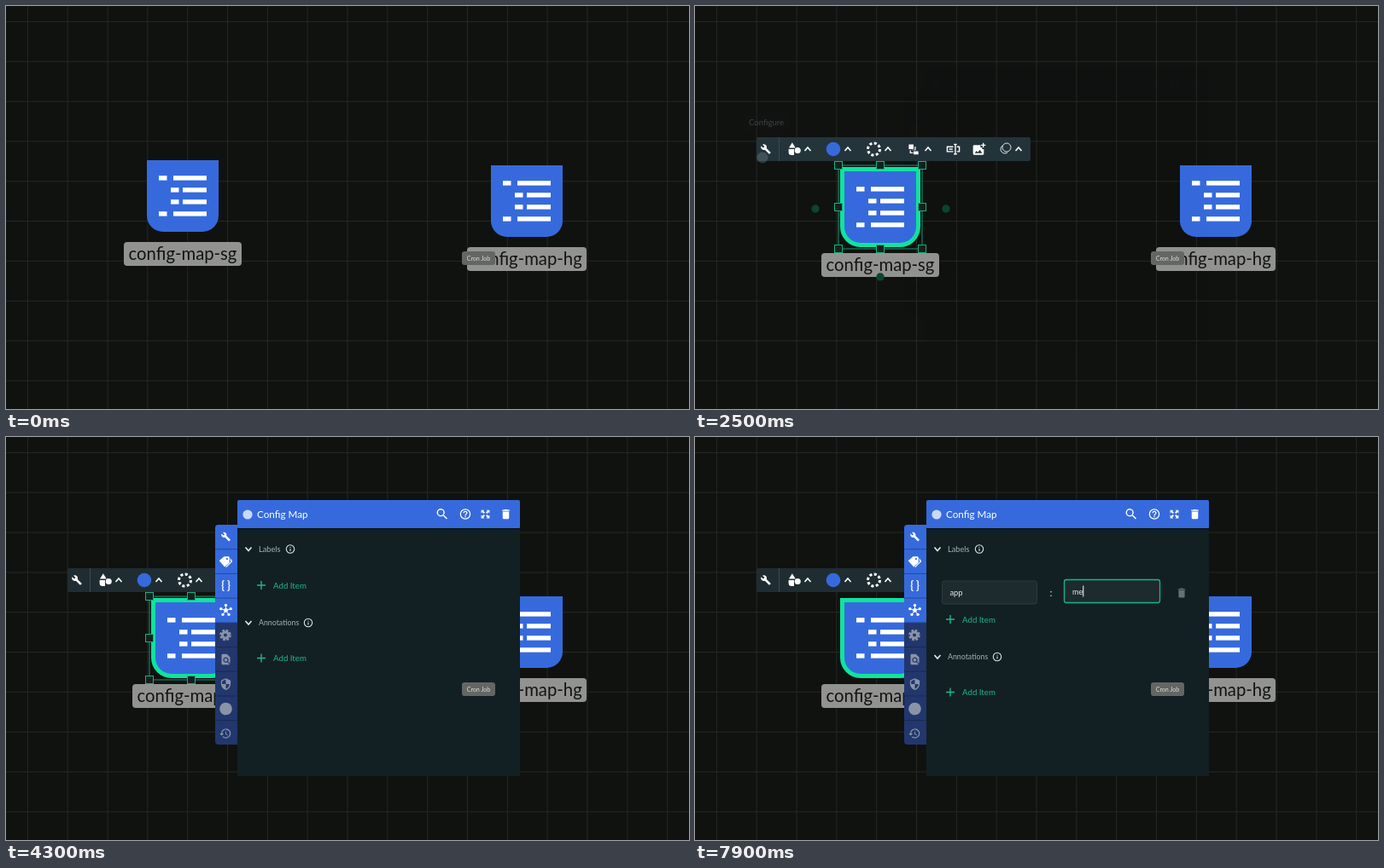
Recreate the animation shown at these times as an HTML page. Size 800 by 473 pixels, loop 8000 ms.

```html
<!DOCTYPE html>
<html lang="en">
<head>
<meta charset="utf-8">
<title>Config map editor</title>
<style>
html, body { margin: 0; width: 100%; height: 100%; overflow: hidden; background: #101210; }
svg { display: block; width: 800px; height: 473px; }
text { font-family: Lato, "Open Sans", sans-serif; white-space: pre; }
</style>
</head>
<body>
<svg id="stage" viewBox="0 0 800 473" xmlns="http://www.w3.org/2000/svg"></svg>
<script>
const LOOP = 8000;
const BLUE = '#366adc', GREEN = '#0fe3a0', TEAL = '#21b78c', PALE = '#e6eaea', GREY = '#a9b1b1';

const ring = 'M12 2a10 10 0 1 0 0 20 10 10 0 0 0 0-20zm0 18a8 8 0 1 1 0-16 8 8 0 0 1 0 16z';
const ICONS = {
  wrench: 'M22.7 19l-9.1-9.1c.9-2.3.4-5-1.5-6.9-2-2-5-2.4-7.4-1.3L9 6 6 9 1.6 4.7C.4 7.1.9 10.1 2.9 12.1c1.9 1.9 4.6 2.4 6.9 1.5l9.1 9.1c.4.4 1 .4 1.4 0l2.3-2.3c.5-.4.5-1.1.1-1.4z',
  search: 'M15.5 14h-.8l-.3-.3a6.5 6.5 0 1 0-.7.7l.3.3v.8l5 5 1.5-1.5zm-6 0a4.5 4.5 0 1 1 0-9 4.5 4.5 0 0 1 0 9z',
  help: ring + 'M11 16h2v2h-2zM12 6a4 4 0 0 0-4 4h2a2 2 0 1 1 4 0c0 2-3 1.75-3 5h2c0-2.25 3-2.5 3-5a4 4 0 0 0-4-4z',
  info: ring + 'M11 7h2v2h-2zM11 11h2v6h-2z',
  trash: 'M6 19a2 2 0 0 0 2 2h8a2 2 0 0 0 2-2V7H6zM19 4h-3.5l-1-1h-5l-1 1H5v2h14z',
  expand: 'M3 3h7L7.7 5.3 11 8.600 8.600 11 5.300 7.700 3 10zM21 3v7l-2.300-2.300L15.400 11 13 8.600l3.300-3.300L14 3zM3 21v-7l2.300 2.300L8.600 13 11 15.400l-3.300 3.300L10 21zM21 21h-7l2.300-2.300L13 15.400 15.400 13l3.300 3.300L21 14z',
  tag: 'M1 11 9 4h7a2 2 0 0 1 2 2v8l-8 7zM14 6.500a1.500 1.500 0 1 0 0 3 1.500 1.500 0 0 0 0-3zM19 6l4 6-10 10-1.500-1L20 13z',
  page: 'M20 19.600V8l-6-6H6a2 2 0 0 0-2 2v16a2 2 0 0 0 2 2h12l1.200-.4-4.400-4.400A5 5 0 1 1 16.200 15.800zM9 13a3 3 0 1 0 6 0 3 3 0 0 0-6 0z',
  shield: 'M12 1 3 5v6c0 5.500 3.800 10.700 9 12 5.200-1.300 9-6.500 9-12V5zm0 11h7c-.5 4.100-3.300 7.800-7 8.900V12H5V6.300l7-3.100z',
  history: 'M13 3a9 9 0 0 0-9 9H1l4 4 4-4H6a7 7 0 1 1 2.100 5l-1.400 1.400A9 9 0 1 0 13 3zm-1 5v5l4.300 2.500.7-1.200-3.500-2.100V8z',
  shapes: 'M9 1 3.500 10h11zM3 12h9v10H8a5 5 0 0 1-5-5zM18 9a5 5 0 1 0 0 10 5 5 0 0 0 0-10z',
  layers: 'M3 3h9v9H3zM14 7h2v7h-7v-1h5zM12 16h9v6h-9zM5 14h2v4h4v2H5z',
  rename: 'M1 7h11v2H3v6h9v2H1zM18 7h5v10h-5v-2h3V9h-3zM13 3h5v2h-1.500v14H18v2h-5v-2h1.500V5H13zM5 11h6v2H5z',
  picture: 'M3 5h11v4h3v3h3v8a2 2 0 0 1-2 2H3a2 2 0 0 1-2-2V7a2 2 0 0 1 2-2zm1 14h13l-4-6-3.500 4.500L7 15zM18 1h2v3h3v2h-3v3h-2V6h-3V4h3z'
};

const rect = (x, y, w, h, fill, more = '') =>
  `<rect x="${x}" y="${y}" width="${w}" height="${h}" fill="${fill}" ${more}/>`;
const disc = (x, y, r, fill, more = '') => `<circle cx="${x}" cy="${y}" r="${r}" fill="${fill}" ${more}/>`;
const line = (d, color, w = 1.5) => `<path d="${d}" fill="none" stroke="${color}" stroke-width="${w}"/>`;
const text = (x, y, s, size, fill, more = '') =>
  `<text x="${x}" y="${y}" font-size="${size}" fill="${fill}" ${more}>${s}</text>`;
const icon = (name, x, y, size, fill = '#fff') =>
  `<path d="${ICONS[name]}" fill="${fill}" fill-rule="evenodd" transform="translate(${x - size / 2} ${y - size / 2}) scale(${size / 24})"/>`;
const group = (id, body, more = '') => `<g id="${id}" ${more}>${body}</g>`;
const chevron = (x, y, dir, color = '#fff') =>
  line(`M${x - 3.5} ${y - 2 * dir}l3.5 ${4 * dir} 3.5 ${-4 * dir}`, color, 1.6);
const gear = (x, y, color) =>
  `<circle cx="${x}" cy="${y}" r="5.6" fill="none" stroke="${color}" stroke-width="2.4" stroke-dasharray="2.7 1.7"/>` +
  `<circle cx="${x}" cy="${y}" r="3.5" fill="none" stroke="${color}" stroke-width="3"/>`;

function grid() {
  let d = '';
  for (let x = 25.4; x < 800; x += 46.83) d += `M${x.toFixed(1)} 0V473`;
  for (let y = 18.4; y < 473; y += 46.83) d += `M0 ${y.toFixed(1)}H800`;
  return line(d, '#272823', 1);
}

// Shield-like tile with rounded bottom corners, grown by g on every side
const tile = (g, r) =>
  `M${-g} ${-g}H${84 + g}V${84 + g - r}a${r} ${r} 0 0 1 ${-r} ${r}H${r - g}a${r} ${r} 0 0 1 ${-r} ${-r}z`;

function node(name, labelW) {
  const bars = [[14, 31], [28, 42], [28, 42], [14, 31]].map(([a, b], i) =>
    rect(a, 18.2 + i * 14, 9.5, 5.4, '#fff') + rect(b, 18.2 + i * 14, 70 - b, 5.4, '#fff')).join('');
  return `<path d="${tile(0, 19)}" fill="${BLUE}"/>` + bars +
    rect(42 - labelW / 2, 96, labelW, 28, '#929391', 'rx="4"') +
    text(42, 116.5, name, 20.3, '#121412', 'text-anchor="middle"');
}

function handles() {
  let s = rect(168, 187, 98, 98, 'none', 'stroke="#0d9a70"');
  for (let i = 0; i < 9; i++)
    if (i !== 4) s += rect(163.5 + i % 3 * 49, 182.5 + (i / 3 | 0) * 49, 9, 9, '#14211c', 'stroke="#12b383"');
  return s;
}

function toolbar() {
  return rect(72, 154, 321, 28, '#24343b', 'id="bar" rx="2"') + rect(98, 154, 1, 28, '#3c4b51') +
    disc(79, 178, 6.5, '#8b979b', 'id="ripple" opacity="0"') +
    icon('wrench', 83, 168, 12.5) + icon('shapes', 116, 168, 17) +
    disc(162, 168, 8.3, BLUE) +
    '<circle cx="209.500" cy="168" r="7" fill="none" stroke="#fff" stroke-width="3" stroke-dasharray="3.100 2.400"/>' +
    icon('layers', 256, 168, 15) + icon('rename', 302.5, 168, 17) + icon('picture', 333, 168, 16) +
    '<g fill="none" stroke="#dfe4e5"><circle cx="365" cy="166" r="5"/><path d="M360 164a5 5 0 1 0 6 8"/></g>' +
    [132, 179, 226, 273, 379].map(x => chevron(x, 168, -1)).join('');
}

function tabs() {
  const dim = '#8a94a8';
  let s = rect(245, 103, 30, 258, '#22376d', 'rx="4"') +
    `<path d="M249 103h22v115h-26v-111a4 4 0 0 1 4-4z" fill="${BLUE}"/>`;
  for (let i = 1; i < 9; i++) s += rect(245, 102.5 + i * 28.7, 26, 1, i < 5 ? '#24499c' : '#192a52');
  const spokes = [0, 1, 2, 3, 4].map(k => {
    const a = k * Math.PI * .4 - Math.PI / 2, x = 257.5 + 6 * Math.cos(a), y = 203.5 + 6 * Math.sin(a);
    return line(`M257.5 203.5L${x} ${y}`, '#fff', 1) + disc(x, y, 1.7, '#fff');
  }).join('');
  return s + icon('wrench', 257.5, 117, 11.5) + icon('tag', 257.5, 146, 17) +
    text(257.5, 179, '{ }', 12.5, '#fff', 'text-anchor="middle" font-weight="700"') +
    spokes + disc(257.5, 203.5, 2.4, '#fff') + gear(257, 232.5, dim) +
    icon('page', 257.5, 261, 15, dim) + icon('shield', 257.5, 290, 15, dim) +
    disc(257.5, 319, 7.3, dim) + icon('history', 257, 348, 15, dim);
}

const heading = (y, s, infoX, size) => chevron(284, y, 1, PALE) +
  text(296, y + 3.3, s, size, GREY) + icon('info', infoX, y, 12.5, PALE);
const addItem = y => line(`M294 ${y}h10M299 ${y - 5}v10`, TEAL, 1.4) + text(313, y + 3.6, 'Add Item', 9.7, TEAL);

const config = text(278, 135, 'Immutable', 8.8, GREY) + icon('info', 329.5, 132, 12.5, PALE) +
  disc(285, 153.5, 6.3, 'none', `stroke="${PALE}" stroke-width="1.4"`) + text(299, 157, 'Yes', 9.3, PALE) +
  disc(332, 153.5, 6.3, 'none', 'stroke="#14cb92" stroke-width="1.5"') + disc(332, 153.5, 3.6, '#14cb92') +
  text(346, 157, 'No', 9.3, PALE) +
  heading(189.5, 'Binary Data', 352.5, 8.9) + addItem(231) + heading(274.5, 'Data', 325.5, 8.9) + addItem(316);

const row = rect(289.5, 169, 111, 27, '#1d2a2e', 'id="keyBox" rx="2.5"') +
  rect(432.5, 167.5, 112, 27, '#1d2a2e', 'id="valBox" rx="2.5"') +
  rect(441, 175, 46, 13, '#31609c', 'id="marked"') +
  text(298.5, 186, '', 9.3, PALE, 'id="key"') + text(442, 184.8, '', 9.1, PALE, 'id="val"') +
  rect(0, 0, 1, 13, '#fff', 'id="caret"') +
  text(415.5, 186.5, ':', 12, PALE) + icon('trash', 570, 183, 14.5, '#667174');

const labels = heading(131.5, 'Labels', 333, 9.2) + group('row', row) +
  group('below', addItem(214) + heading(258, 'Annotations', 354, 8.8) + addItem(299.5));

const panel = tabs() + rect(271, 74, 331, 324, '#122023') + rect(271, 74, 331, 33.5, BLUE, 'rx="2"') +
  rect(271, 107, 331, 1.5, '#0b1415') +
  disc(283, 91, 5.6, '#cbd9f6') + text(294, 95, 'Config Map', 11.7, '#fff') +
  icon('search', 511, 90.5, 17) + icon('help', 538, 90.5, 15) + icon('expand', 561.5, 90.5, 13) + icon('trash', 585.5, 90.5, 15) +
  group('config', config) + group('labels', labels);

const tip = (id, x, y, w, s, size) => group(id, rect(x, y, w, 21, '#141819', 'rx="3"') +
  text(x + w / 2, y + 13.7, s, size, '#f2f4f4', 'text-anchor="middle"'));

document.getElementById('stage').innerHTML = rect(0, 0, 800, 473, '#101210') + grid() +
  group('far', node('config-map-hg', 140), 'transform="translate(568 187)"') +
  group('near', `<path id="halo" d="${tile(0, 19)}" fill="${GREEN}" stroke="${GREEN}" stroke-width="10"/>` +
    node('config-map-sg', 138) + `<path id="press" d="${tile(23, 28)}" opacity=".26"/>`) +
  group('ports', [[141, 238], [294, 238], [217, 318]].map(p => disc(...p, 4.7, '#0c4431')).join('')) +
  group('handles', handles()) + group('toolbar', toolbar()) +
  tip('tipConfig', 56, 126, 55, 'Configure', 9.6) +
  group('panel', panel) + tip('tipLabels', 190, 136, 45, 'Labels', 10) +
  rect(534, 288, 39, 16, '#646664', 'rx="3"') +
  text(553.5, 298.6, 'Cron Job', 7.1, '#dcdcda', 'text-anchor="middle"');

const el = id => document.getElementById(id);
const set = (id, name, value) => el(id).setAttribute(name, value);
const within = (t, a, b = LOOP) => t >= a && t < b ? 1 : 0;
const show = (id, on) => set(id, 'opacity', on);
const last = (t, steps) => steps.reduce((v, [at, s]) => t >= at ? s : v, '');
const ramp = (t, a, b) => Math.min(1, Math.max(0, (t - a) / (b - a)));

const KEY = [[4700, ''], [5300, 'a'], [5500, 'ap'], [5700, 'app']];
const VAL = [[4700, 'New Value'], [7200, ''], [7800, 'm'], [7900, 'me']];

function field(id, s, hint) {
  el(id).textContent = s || hint;
  set(id, 'fill', s ? PALE : '#707b7d');
  return s ? el(id).getComputedTextLength() : 0;
}

function focus(id, on) {
  set(id, 'stroke', on ? '#13b886' : '#2d3b3f');
  set(id, 'stroke-width', on ? 1.3 : 1);
}

function draw(t) {
  const drag = ramp(t, 600, 900);
  set('near', 'transform', `translate(${165 + 10 * drag} ${181 + 13 * drag})`);
  show('press', .26 * within(t, 400, 1400));
  show('halo', within(t, 1600));
  show('handles', within(t, 1600, 4400));
  show('toolbar', within(t, 1600));
  show('ports', within(t, 1600, 2700));
  set('bar', 'fill', t < 2700 ? '#24343b' : '#1f2d32');
  show('ripple', .45 * within(t, 2400) * (1 - ramp(t, 2400, 2700)));
  show('tipConfig', ramp(t, 1850, 2050) * (1 - ramp(t, 2350, 2540)));
  show('tipLabels', ramp(t, 3200, 3400) * (1 - ramp(t, 3800, 4000)));

  show('panel', ramp(t, 2500, 2750));
  show('config', within(t, 0, 3800));
  show('labels', within(t, 3800));
  show('row', within(t, 4700));
  set('below', 'transform', `translate(0 ${t < 4700 ? -40 : 0})`);

  const onValue = t >= 6900;
  focus('keyBox', !onValue);
  focus('valBox', t >= 6600);
  show('marked', within(t, 6900, 7200));
  const keyW = field('key', last(t, KEY), 'key');
  const valW = field('val', last(t, VAL), 'value');
  set('caret', 'x', onValue ? 442 + valW : 298.5 + keyW);
  set('caret', 'y', onValue ? 174.5 : 176);
  show('caret', 1 - within(t, 6900, 7200));
}

const start = performance.now();
function tick() {
  draw((performance.now() - start) % LOOP);
  requestAnimationFrame(tick);
}
tick();
</script>
</body>
</html>
```
